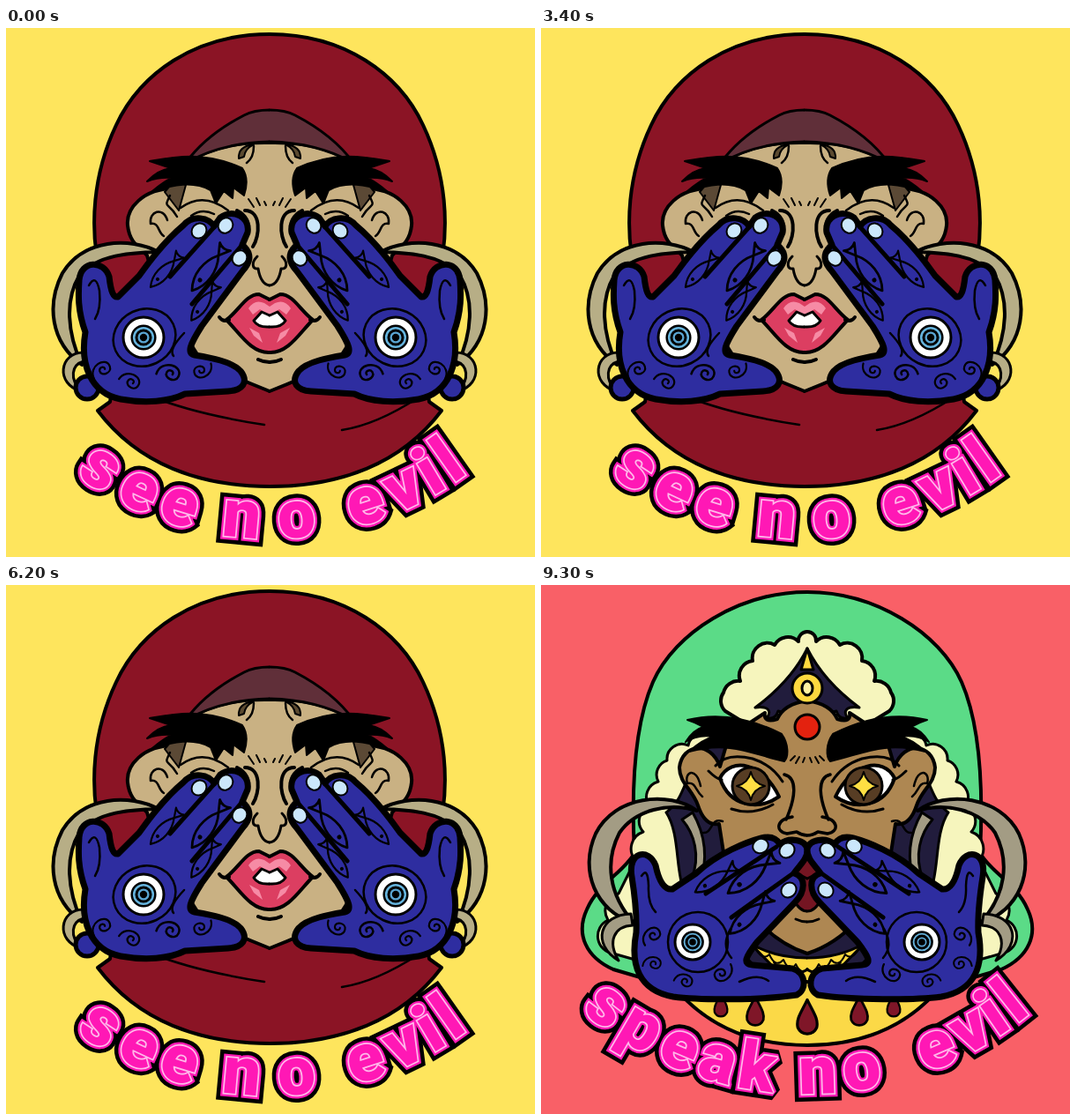
These frames come from a looping animation (600 px wide and 600 px high, 9400 ms). An HTML page:

```html
<!DOCTYPE html>
<html lang="en">
<head>
<meta charset="utf-8">
<title>See, speak, hear no evil</title>
<style>
  html, body { margin: 0; width: 100%; height: 100%; overflow: hidden; }
  svg { display: block; width: 100vw; height: 100vh; }
  g { stroke: #000; stroke-linecap: round; stroke-linejoin: round; }
  text { font: 800 76px Roboto, "Open Sans", sans-serif; text-anchor: middle; stroke-linejoin: miter; stroke-miterlimit: 2; }
</style>
</head>
<body>
<svg id="stage" viewBox="0 0 600 600"></svg>
<script>
const INK = '#000', BLUE = '#2e2da0', NAIL = '#cbe7fb', GOLD = '#fdd83f';

const path = (d, fill = 'none', w = 4) => `<path d="${d}" fill="${fill}" stroke-width="${w}"/>`;
const oval = (x, y, rx, ry, fill = 'none', w = 3, turn = 0) =>
  `<ellipse cx="${x}" cy="${y}" rx="${rx}" ry="${ry}" fill="${fill}" stroke-width="${w}" transform="rotate(${turn} ${x} ${y})"/>`;
const dot = (x, y, r, fill, w) => oval(x, y, r, r, fill, w);
const put = (x, y, turn, size, body) =>
  `<g transform="translate(${x} ${y}) rotate(${turn}) scale(${size})">${body}</g>`;
// Left half plus its mirror image; outlines stay open along the middle.
const both = (cx, body) => `<g>${body}</g><g transform="translate(${2 * cx}) scale(-1 1)">${body}</g>`;

const swirl = (x, y, turn, size = 1) => put(x, y, turn, size,
  path('M-14,9C-16,-9 10,-13 10,1C10,10 -5,10 -4,2C-3,-3 4,-2 3,2', 'none', 2.5));
const fish = (x, y, turn, size = 1) => put(x, y, turn, size,
  path('M24,0C12,-9 -4,-8 -16,0L-26,-6Q-22,0 -26,6L-16,0C-4,8 12,9 24,0Z', 'none', 2.2) + dot(12, 0, 1.5, INK, 1));
const charm = (x, y, r) => dot(x, y, r, '#fff', 3) + dot(x, y, r * .58, '#65b3dc', 2.5) +
  dot(x, y, r * .35, '#5aa5d2', 3) + dot(x, y, r * .14, INK, 2);
const nails = (list, r) => list.map(([x, y, turn]) => oval(x, y, r, r + 1, NAIL, 2, turn)).join('');
const star = (x, y, r) =>
  path(`M${x},${y - r}Q${x + 3},${y - 3} ${x + r},${y}Q${x + 3},${y + 3} ${x},${y + r}Q${x - 3},${y + 3} ${x - r},${y}Q${x - 3},${y - 3} ${x},${y - r}Z`, '#ffdf43', 2);

// Letters sit on an arc; each has its own angle in degrees.
function caption(word, cx, cy, radius, angles) {
  const layer = (fill, stroke, w) => [...word.replaceAll(' ', '')].map((ch, i) =>
    `<text transform="rotate(${angles[i]} ${cx} ${cy})" x="${cx}" y="${cy + radius + 20}" fill="${fill}" stroke="${stroke}" stroke-width="${w}">${ch}</text>`).join('');
  return layer(INK, INK, 17) + layer('#ff18b5', '#ff18b5', 8) +
    layer('#ffb9ea', '#ffb9ea', 3.5) + layer('#ff18b5', 'none', 0);
}

function see() {
  const cx = 299, skin = '#c9b183', hood = '#8b1425';
  const head =
    path('M299,7C214,7 152,52 125,110C99,165 94,225 107,280L132,330L118,424L104,434C150,495 220,520 299,520', hood) +
    path('M299,130C255,129 225,138 203,155L191,182C155,182 136,205 138,224C140,244 152,249 160,258L172,300L222,378Q258,396 299,412', skin) +
    path('M299,93Q281,93 270,99Q226,122 204,153Q245,130 299,129', '#602f39', 3) +
    path('M180,186L192,172L204,178L196,207Z', '#5b4935', 2) +
    path('M183,218C178,202 162,208 164,222C174,220 172,232 179,236M194,214C184,196 178,206 186,190', 'none', 2.5) +
    path('M264,148Q263,134 281,132Q271,137 270,146Z', '#5b4a30', 2) +
    path('M281,134Q281,147 273,153M198,204Q224,185 252,207M210,213Q222,204 236,211', 'none', 2.5) +
    path('M271,207C290,207 288,236 280,248M262,207C272,212 278,222 273,230', 'none', 4) +
    path('M285,259C278,266 279,274 286,273C288,285 292,291 299,292', 'none', 3) +
    path('M275,194l6,9M284,193l4,8M293,197l2,4', 'none', 2) +
    path('M163,151C191,146 225,139 268,159C275,169 273,181 270,190L258,181L257,193L247,185L238,199L232,184C212,173 190,178 166,185Q178,175 188,170Q173,169 160,174Q172,161 187,159Z', INK, 2);
  const mouth =
    path('M299,308L287,302C272,302 264,321 250,331C265,346 278,369 299,368', '#dc3e61') +
    path('M275,318Q282,307 293,312L299,316V326L288,319L280,325ZM276,340L287,346L291,357L281,349Z', '#f68ba5', 0) +
    path('M299,326L290,322L281,332Q286,340 299,339', '#fff', 3) +
    path('M242,328Q246,334 253,331M286,376Q292,379 299,379');
  const rings =
    path('M173,254C140,237 88,239 64,278C46,313 50,356 86,382C69,345 67,308 83,281C104,256 144,255 173,254Z', '#b7ae86') +
    path('M88,368C60,368 56,404 85,412C72,398 74,382 88,378Z', '#b7ae86', 3);
  const hand = dot(92, 408, 13, BLUE, 5) +
    path('M83,286C85,263 111,263 117,282C119,300 122,306 127,305L151,281C166,260 184,238 201,224C212,211 230,215 236,225L243,215C258,204 277,215 274,232L268,246C281,257 276,267 268,276L222,338C208,360 205,369 214,371C232,374 256,378 266,389C276,402 268,411 252,412L203,415C185,424 158,426 130,421C95,414 84,380 90,345C81,320 82,302 83,286Z', BLUE, 7) +
    path('M235,227L186,282M267,247L211,313', 'none', 5) +
    nails([[219, 230, 42], [249, 224, 35], [265, 261, 38]], 8) +
    fish(180, 276, 132) + fish(229, 274, 127, 1.25) + fish(224, 312, 125) +
    oval(157, 351, 36, 32, 'none', 2.5, -25) + charm(156, 351, 23) +
    swirl(187, 390, 25) + swirl(222, 390, 170, .85) + swirl(143, 400, 40, .9) +
    swirl(109, 386, -20, .9) + path('M94,292Q102,278 106,298Q108,319 101,330M202,346Q184,365 190,372', 'none', 2.5);
  return both(cx, head) + path('M165,418Q215,438 293,450M381,456Q420,450 468,419', 'none', 2.5) +
    both(cx, mouth) + both(cx, rings) + both(cx, hand) +
    caption('see no evil', 300, 205, 354, [33.2, 25, 17, 5.3, -4.8, -17.8, -25.5, -31, -35.2]);
}

function speak() {
  const cx = 302, skin = '#ae8752', hair = '#211c3c', cream = '#f6f5bd', silver = '#a39c84';
  const head =
    path('M302,8C225,8 152,54 127,110C103,165 103,245 106,304C95,325 65,338 52,368C39,396 51,422 82,436L150,456L302,470', '#5bdb87') +
    path('M302,53a10,10 0 0 0 -10,11a17,17 0 0 0 -27,4a17,17 0 0 0 -25,18a17,17 0 0 0 -14,23a17,17 0 0 0 -19,13a16,16 0 0 0 2,21L302,200', cream) +
    path('M200,180a17,17 0 0 0 -33,2a17,17 0 0 0 -24,17a17,17 0 0 0 -10,24a18,18 0 0 0 -10,28a18,18 0 0 0 -7,29a20,20 0 0 0 -9,32L88,350a20,20 0 0 0 -12,30a20,20 0 0 0 6,38L160,440L220,300Z', cream, 3) +
    path('M302,300L215,172L185,186C160,220 165,240 142,258C158,282 152,325 163,350L240,430L302,440', hair, 3) +
    path('M302,72C286,104 262,125 243,139C258,137 262,143 256,151Q266,153 269,143L302,152', hair, 3);
  const face =
    path('M302,131C282,134 272,143 268,152Q252,157 254,145L213,172L203,206C192,176 160,180 157,207C157,225 172,232 178,250Q186,274 202,271L208,310C225,370 262,405 302,418', skin) +
    path('M181,228C176,205 162,212 166,225C176,223 175,234 183,240M206,268C192,263 195,282 184,281', 'none', 2.5) +
    path('M172,258C187,284 190,310 180,340C174,344 169,340 171,333C181,307 174,282 160,266Z', silver, 3) +
    path('M203,219C216,194 252,202 270,240C247,256 214,252 203,219Z', '#fff') +
    dot(238, 228, 21, '#573d24', 3) + star(238, 228, 16) +
    path('M190,211Q199,220 205,221M198,205Q210,190 240,197Q262,204 274,223M216,254Q240,262 263,249', 'none', 3) +
    path('M166,153C191,147 228,146 273,169C281,180 281,195 276,200C242,193 216,176 168,189Q183,175 196,172Q178,169 164,178Q173,164 184,161Q176,156 166,153Z', INK, 2) +
    path('M276,215C292,219 288,243 278,266M285,263C267,265 265,280 279,282L290,280Q296,284 302,284', 'none', 3.5) +
    path('M283,199l5,-5M289,202l4,-7M297,201l2,-5', 'none', 2) +
    path('M302,310L286,318L286,356Q293,370 302,370', '#741522', 3) +
    path('M302,333l-10,-5M289,379Q295,382 302,382', 'none', 3);
  const jewels = path('M302,72L295,96H309Z', GOLD, 3) + dot(302, 117, 17, GOLD, 3) +
    oval(302, 117, 6, 8, '#fff1a0', 3) + oval(302, 161, 14, 14, '#e3220f', 3);
  const dress =
    path('M302,450L150,455C185,497 235,522 302,522', '#fbd947') +
    path('M302,423Q266,423 238,407L270,440L302,450', GOLD, 3) +
    path('M244,414q8,12 15,5q7,16 16,6q7,16 14,5q6,13 13,5M264,428q9,12 18,4q9,12 20,5', 'none', 2);
  const drop = (x, y, s) => put(x, y, 0, s, path('M0,-20C6,-7 12,0 10,9C6,18 -6,18 -10,9C-12,0 -6,-7 0,-20Z', '#7f1628', 3));
  const drops = both(cx, drop(204, 478, .72) + drop(243, 485, .92)) + drop(302, 492, 1.08);
  const rings =
    path('M177,256C145,233 83,239 62,282C43,324 62,370 105,383C77,351 72,314 89,281C107,255 145,246 177,256Z', silver) +
    path('M102,373C66,374 57,407 88,426C75,404 83,387 104,386Z', silver, 3);
  const hand =
    path('M103,331C98,302 122,298 130,318C134,337 140,346 149,345L176,327C200,304 235,291 250,287C262,284 268,289 271,294C281,286 300,288 302,300C303,311 291,320 287,327C301,331 300,348 288,360L245,405C232,422 228,430 240,431L285,435C301,440 302,459 290,465C250,471 180,471 150,467C111,460 101,431 108,394C109,370 106,350 103,331Z', BLUE, 7) +
    path('M267,297L187,350M286,327L216,377', 'none', 5) +
    nails([[249, 296, 60], [279, 301, 50], [281, 346, 50]], 8) +
    fish(197, 334, 147, 1.1) + fish(238, 330, 143, 1.35) + fish(236, 375, 137, 1.25) +
    oval(178, 405, 34, 34, 'none', 2.5) + charm(172, 405, 20) +
    swirl(126, 396, -25, .9) + swirl(128, 428, 15, .8) + swirl(164, 448, 30, .8) + swirl(206, 442, 160, .9) +
    path('M114,330Q121,319 122,341Q121,362 130,371M215,390Q204,409 216,423M225,450Q246,440 258,449', 'none', 2.5);
  return both(cx, head) + both(cx, face) + jewels + both(cx, dress) + drops + both(cx, rings) + both(cx, hand) +
    caption('speak no evil', 302, 182, 375, [37.6, 30.4, 22.8, 15.8, 8.8, -1.8, -9.5, -23, -29.8, -34.6, -38.4]);
}

function hear() {
  const cx = 297, skin = '#705840', silver = '#aea488', dull = '#e6cb66';
  const rings =
    path('M96,248C55,258 47,298 57,333L76,325C66,297 76,274 101,266Z', silver) +
    path('M65,365C48,392 58,424 91,427L96,414C76,413 70,395 78,382Z', silver);
  const body =
    path('M297,380L205,375V410L166,420L105,434C145,487 215,522 297,522', skin) +
    path('M297,380L202,345L209,410C230,421 267,419 297,414', INK, 0) +
    path('M209,407Q198,420 180,424M184,424Q240,420 284,446', 'none', 3) +
    path('M297,491Q272,469 239,461Q205,454 165,459L160,474C190,498 235,522 297,522', '#5f6667') +
    path('M122,402L107,433L166,476Q181,430 180,384Z', '#803544');
  const turban =
    path('M297,5C235,5 176,30 141,74C92,130 72,196 80,243Q92,253 110,248L160,190L200,140L297,122', GOLD) +
    path('M166,152C142,175 125,200 122,228L150,200Z', dull, 3) +
    path('M88,239C90,171 126,105 190,51Q214,36 235,32M100,232C108,162 147,105 205,65Q224,54 240,48M113,224C121,170 150,120 219,76M130,207C137,170 165,139 199,121', 'none', 3);
  const wrap =
    path('M222,66Q245,50 270,50Q330,45 400,100Q340,90 262,86Z', GOLD, 3) +
    path('M222,66Q245,50 270,50L345,84L262,86Z', dull, 3) +
    path('M166,152Q222,98 345,84Q402,98 450,168L428,152Q370,97 297,96Q230,105 166,152Z', dull, 3) +
    path('M236,42Q302,13 358,44', 'none', 3);
  const face =
    path('M297,96C250,100 200,122 165,153L147,192L165,310L201,335Q207,365 232,385Q262,402 297,411', skin) +
    path('M297,96C262,100 224,117 198,141Q230,125 260,115Q274,125 297,124', '#21133f', 3) +
    path('M148,198L157,180L174,171L196,205L194,260L160,240Z', '#24180f', 2) +
    path('M198,207C211,196 247,199 265,239C242,255 209,249 198,207Z', '#fff') +
    dot(234, 230, 21, '#34251b', 3) + star(234, 230, 18) +
    path('M188,206Q212,181 246,202Q262,212 268,225M214,254Q238,262 261,246', 'none', 3) +
    path('M164,154C189,146 231,143 266,170C275,181 274,195 269,202C242,195 217,178 170,189Q185,178 191,174Q174,173 163,181Q174,167 184,163Q176,157 164,154Z', INK, 2) +
    path('M272,207C284,217 275,242 284,264M279,264C258,267 258,286 276,284Q286,281 297,291', 'none', 3.5) +
    path('M275,194Q280,190 283,201M288,197l3,5M294,195l1,6', 'none', 2) +
    path('M297,304L287,298C273,300 263,319 246,331C263,347 277,372 297,370', '#5c1129') +
    path('M297,328L289,324L280,331Q285,340 297,341', '#fff', 3) +
    path('M239,329Q243,335 250,331M281,379Q289,383 297,383', 'none', 3);
  const hand = dot(104, 416, 18, BLUE, 5) +
    path('M22,304C33,295 48,303 59,313C75,315 82,300 84,284L103,231C108,214 135,213 138,231L147,214C150,197 181,198 180,219L178,237C188,229 207,232 205,250L188,319C186,331 190,335 201,332C216,328 231,337 228,350C223,364 205,360 195,369C183,387 178,401 150,408C121,416 91,412 77,396C61,376 63,360 46,350C25,339 15,313 22,304Z', BLUE, 7) +
    path('M138,231L127,300M179,238L164,305', 'none', 5) +
    nails([[121, 235, 15], [165, 214, 12], [189, 248, 15]], 9.5) +
    fish(113, 278, 105, 1.2) + fish(155, 263, 101, 1.4) + fish(177, 290, 104, 1.15) +
    oval(124, 344, 39, 33, 'none', 2.5) + charm(124, 344, 28) +
    swirl(86, 380, -15, .85) + swirl(117, 393, 25, .85) + swirl(153, 387, 40, .85) +
    swirl(177, 366, 0, .75) + swirl(72, 354, 180, .75) +
    path('M32,309Q50,310 57,326Q62,336 76,331M180,350Q205,339 216,348', 'none', 2.5);
  return both(cx, rings) + both(cx, body) + both(cx, turban) + wrap + both(cx, face) + both(cx, hand) +
    caption('hear no evil', 297, 190, 367, [34.8, 27.6, 20.2, 13, 1.8, -6.5, -20, -26.8, -31.4, -35.2]);
}

const scenes = [['#fee55d', see], ['#f96067', speak], ['#fda15f', hear]];
const stage = document.getElementById('stage');
stage.innerHTML = scenes.map(([color, draw]) =>
  `<g visibility="hidden"><rect width="600" height="600" fill="${color}" stroke="none"/>${draw()}</g>`).join('');

// Hard cuts: see, speak, hear, speak and round again.
const LOOP = 9400;
const cuts = [0, 1000, 1800, 2600, 3400, 4200, 5000, 5800, 6200, 7000, 7800, 8600];
const order = [0, 1, 2, 1];

function render(ms) {
  const t = ms % LOOP;
  const step = cuts.findLastIndex(cut => cut <= t);
  [...stage.children].forEach((g, i) =>
    g.setAttribute('visibility', i === order[step % 4] ? 'visible' : 'hidden'));
}

const start = performance.now();
function tick() {
  render(performance.now() - start);
  requestAnimationFrame(tick);
}
tick();
</script>
</body>
</html>
```
